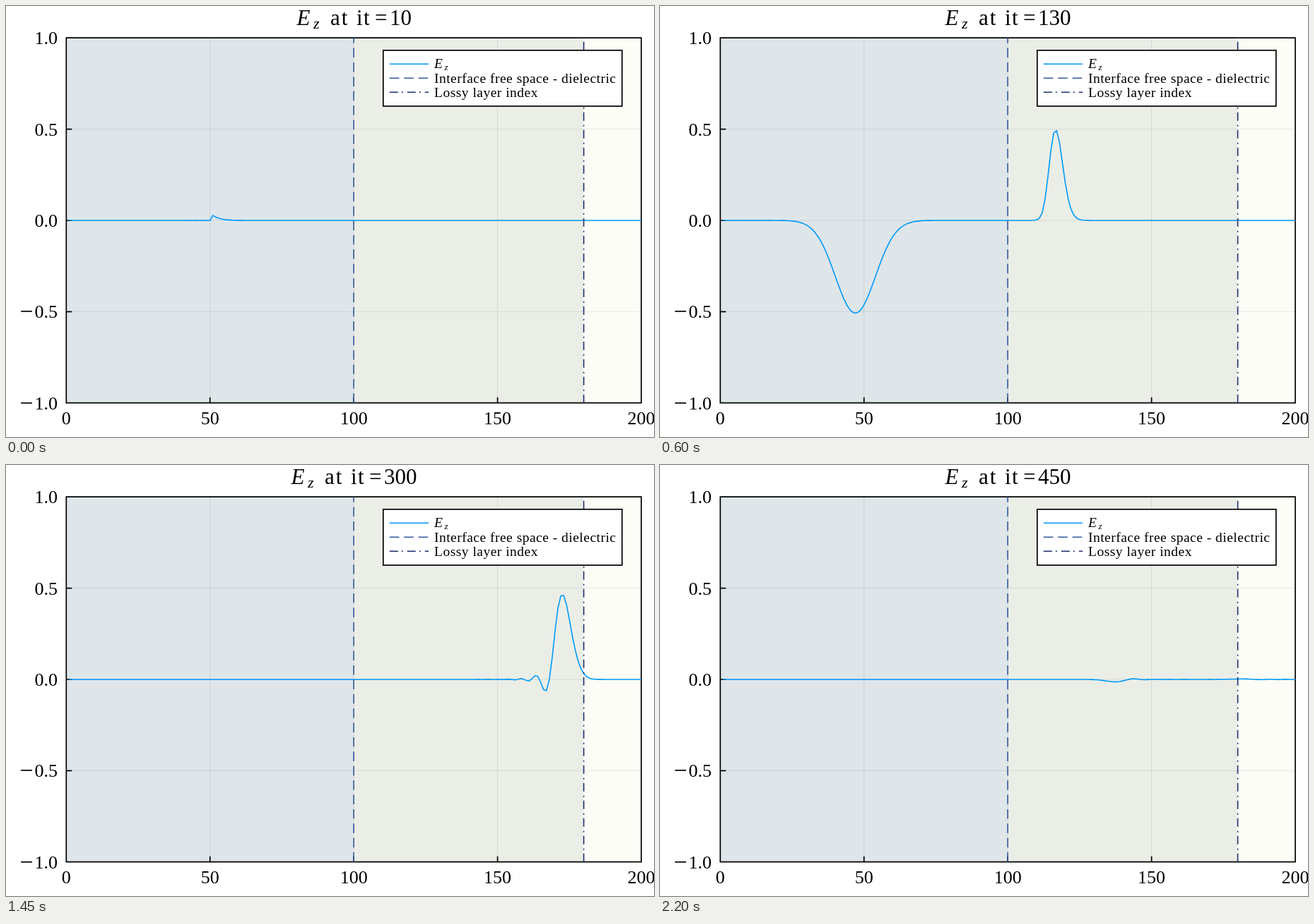
Animation of 917x611 px, one loop 2250 ms. Source, as an HTML page:

```html
<!DOCTYPE html>
<html>
<head>
<meta charset="utf-8">
<style>
html, body { margin: 0; height: 100%; overflow: hidden; background: #fff; }
svg { display: block; font-family: "Liberation Serif", "Times New Roman", serif; }
path, polyline { fill: none; stroke-width: 1.6; }
.axis { stroke: #000; stroke-width: 1.7; }
.grid { stroke: #000; stroke-opacity: .1; stroke-width: .9; }
.wave { stroke: #009af9; stroke-linejoin: round; }
.interface { stroke: #35589c; stroke-dasharray: 13.6 6.8; }
.lossy { stroke: #1c2f6b; stroke-dasharray: 12 5 2 6; }
.ticks { font-size: 26px; }
.legend { font-size: 19.5px; letter-spacing: .025em; }
.title { font-size: 31px; }
.var { font-style: italic; }
</style>
</head>
<body>
<svg width="917" height="611" viewBox="0 0 917 611">
  <rect x="85.3" y="45.2" width="406.8" height="517.5" fill="#dee6ea"/>
  <rect x="492.1" y="45.2" width="325.5" height="517.5" fill="#ebeee7"/>
  <rect x="817.6" y="45.2" width="81.4" height="517.5" fill="#fcfdf6"/>
  <path class="grid" d="M288.7 45V563M492.1 45V563M695.6 45V563M85 174.6H899M85 304H899M85 433.3H899"/>
  <path class="axis" d="M85.3 45.2H899V562.7H85.3ZM288.7 562.7v-8M492.1 562.7v-8M695.6 562.7v-8M85.3 174.6h8M85.3 304h8M85.3 433.3h8"/>
  <polyline class="wave" id="wave"/>
  <path class="interface" d="M492.1 562.7V45.2"/>
  <path class="lossy" d="M817.6 562.7V45.2"/>
  <g class="ticks" id="ticks"></g>
  <g class="legend">
    <rect x="533.8" y="62.8" width="338" height="79.2" fill="#fff" stroke="#000" stroke-width="1.7"/>
    <path class="wave" d="M542.8 82.3H598"/>
    <path class="interface" d="M542.8 102.3H598"/>
    <path class="lossy" d="M542.8 122.3H598"/>
    <text class="var" x="606" y="88">E</text>
    <text class="var" x="620.5" y="91" font-size="13">z</text>
    <text x="606" y="109">Interface free space - dielectric</text>
    <text x="606" y="129">Lossy layer index</text>
  </g>
  <g class="title" id="title">
    <text class="var" x="411.5" y="27">E</text>
    <text class="var" x="435" y="32" font-size="22">z</text>
    <text x="459" y="27" letter-spacing="2">at</text>
    <text x="496" y="27" letter-spacing="1.5">it</text>
    <text x="522" y="27">=</text>
    <text x="543" y="27" id="count"></text>
  </g>
</svg>
<script>
const $ = id => document.getElementById(id);
const px = x => 85.3 + 4.0685 * x;
const py = y => 303.95 - 258.75 * y;

function label(x, y, anchor, text, size = 26) {
  $("ticks").insertAdjacentHTML("beforeend",
    `<text x="${x}" y="${y}" text-anchor="${anchor}" font-size="${size}">${text}</text>`);
}
for (let x = 0; x <= 200; x += 50) label(px(x), 593, "middle", x);
for (let y = -1; y <= 1; y += .5) {
  label(73, py(y) + 9, "end", Math.abs(y).toFixed(1));
  if (y < 0) label(38.5, py(y) + 11, "end", "−", 34);
}

// 1D FDTD: a Gaussian pulse meets a dielectric, then a matched lossy layer.
const N = 201, Z0 = 377, LOSS = .02, LAYER = 180;
const ez = new Float64Array(N + 1), hy = new Float64Array(N + 1);
const pulse = t => Math.exp(-((t - 30) ** 2) / 100);
const keep = i => i < LAYER ? 1 : (1 - LOSS) / (1 + LOSS);
const gain = i => i < LAYER ? 1 : 1 / (1 + LOSS);

function step(t) {
  for (let i = 1; i < N; i++)
    hy[i] = keep(i) * hy[i] + gain(i) / Z0 * (ez[i + 1] - ez[i]);
  hy[50] -= pulse(t) / Z0;
  ez[1] = ez[2];
  for (let i = 2; i <= N; i++)
    ez[i] = keep(i) * ez[i] + gain(i) * (i < 100 ? Z0 : Z0 / 9) * (hy[i] - hy[i - 1]);
  ez[51] += pulse(t + 1);
}

const curves = [];
for (let t = 0; t <= 450; t++) {
  step(t);
  if (t && t % 10 === 0)
    curves.push(Array.from(ez.slice(1, 201),
      (e, i) => px(i + 1).toFixed(2) + "," + py(e).toFixed(2)).join(" "));
}

const start = performance.now();
let shown = -1;
function draw() {
  const k = Math.floor((performance.now() - start) % 2250 / 50);
  if (k !== shown) {
    shown = k;
    const it = 10 * (k + 1);
    $("wave").setAttribute("points", curves[k]);
    $("count").textContent = it;
    $("title").setAttribute("transform", `translate(${it < 100 ? 0 : -8})`);
  }
  requestAnimationFrame(draw);
}
draw();
</script>
</body>
</html>
```
